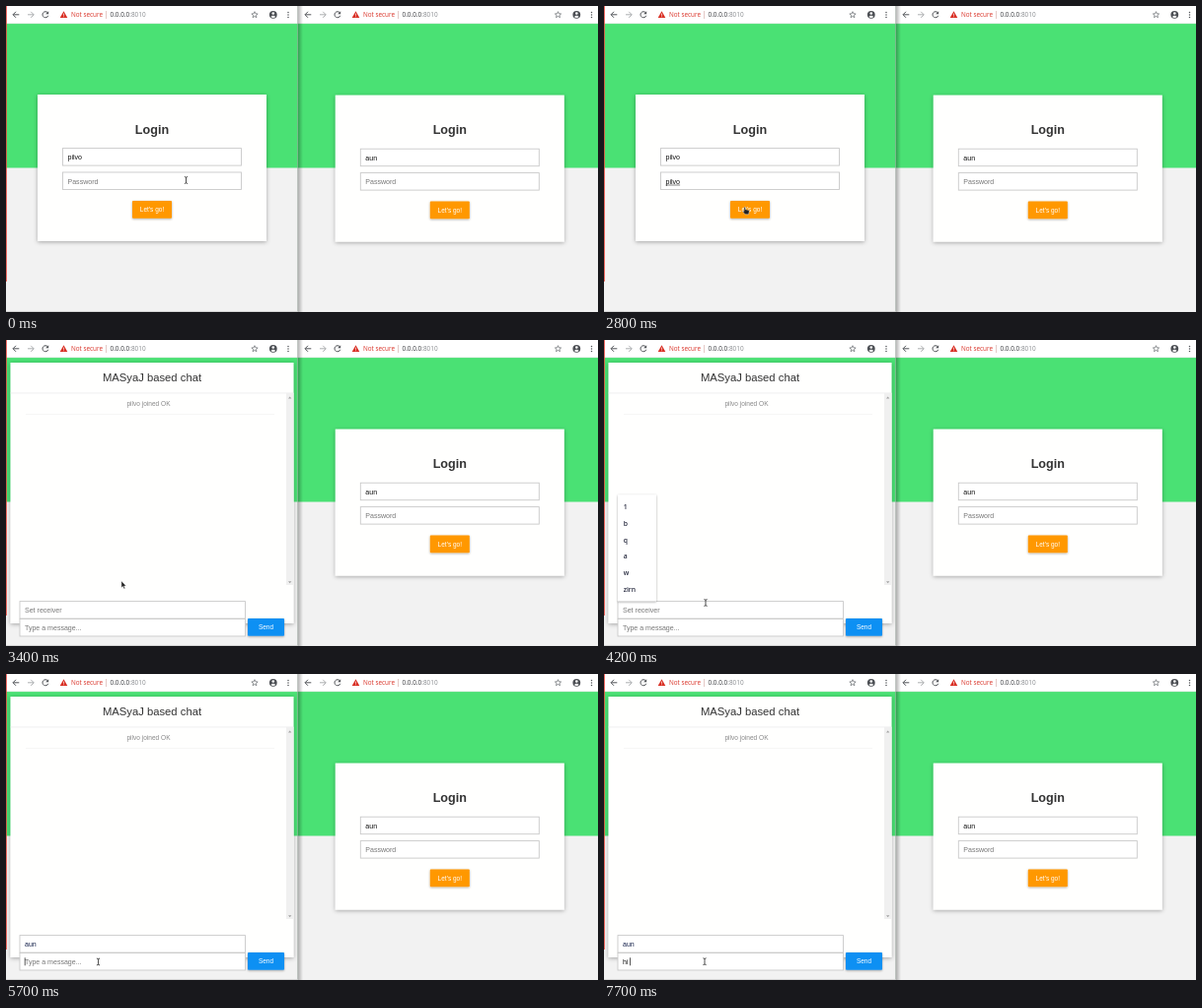
These frames come from a looping animation (600x311 px, 8000 ms). An HTML page:

```html
<!DOCTYPE html>
<html lang="en">
<head>
<meta charset="utf-8">
<title>Chat login</title>
<style>
  html, body { margin: 0; width: 100%; height: 100%; overflow: hidden; background: #f2f2f2; }
  svg { display: block; width: 100vw; height: 100vh; font-family: "Liberation Sans", Arial, sans-serif; }
  text { white-space: pre; }
  .ui { font-family: "Open Sans", "Noto Sans", sans-serif; }
</style>
</head>
<body>
<svg id="stage" viewBox="0 0 600 311">
  <defs>
    <filter id="soft" x="-10%" y="-10%" width="120%" height="125%">
      <feDropShadow dx="0" dy="1" stdDeviation="2" flood-color="#000" flood-opacity=".32"/>
    </filter>
    <filter id="small" x="-10%" y="-20%" width="120%" height="150%">
      <feDropShadow dx="0" dy=".8" stdDeviation=".8" flood-color="#000" flood-opacity=".35"/>
    </filter>
    <linearGradient id="edge">
      <stop offset="0" stop-color="#000" stop-opacity=".28"/>
      <stop offset="1" stop-color="#000" stop-opacity="0"/>
    </linearGradient>
    <clipPath id="leftClip"><rect width="296" height="311"/></clipPath>
  </defs>
  <g id="right"></g>
  <rect x="296" width="5" height="311" fill="url(#edge)"/>
  <g id="left" clip-path="url(#leftClip)"></g>
  <g id="cursor"></g>
</svg>
<script>
const LOOP = 8000;
const USER = "pilvo", PEER = "aun";
const $ = id => document.getElementById(id);

const rect = (x, y, w, h, fill, extra = "") =>
  `<rect x="${x}" y="${y}" width="${w}" height="${h}" fill="${fill}" ${extra}/>`;
const text = (x, y, size, fill, str, extra = "") =>
  `<text x="${x}" y="${y}" font-size="${size}" fill="${fill}" ${extra}>${str}</text>`;
const path = (d, extra) => `<path d="${d}" ${extra}/>`;
const mid = 'text-anchor="middle"';
const line = (color, w) => `fill="none" stroke="${color}" stroke-width="${w}"`;

// Advance widths in em, for placing the caret
const em = c => "il".includes(c) ? .222 : c === " " ? .278 : c === "v" ? .5 : .556;
const widthOf = str => [...str].reduce((sum, c) => sum + em(c), 0) * 7.05;

function toolbar(x, rightX) {
  const ink = line("#505357", 1);
  const star = Array.from({ length: 10 }, (_, i) => {
    const r = i % 2 ? 1.5 : 3.3, a = i * Math.PI / 5 - Math.PI / 2;
    return `${(rightX + 252 + r * Math.cos(a)).toFixed(2)},${(9 + r * Math.sin(a)).toFixed(2)}`;
  }).join(" ");
  const dots = [6.6, 9, 11.4].map(y => `<circle cx="${rightX + 286}" cy="${y}" r=".75" fill="#505357"/>`).join("");
  return path(`M${x + 13.3} 8.8h-6M${x + 10} 5.8l-3 3 3 3`, ink) +
    path(`M${x + 22} 8.8h6M${x + 25.2} 5.8l3 3-3 3`, line("#a3a5a8", .9)) +
    path(`M${x + 42.3} 6.8a3 3 0 1 0 .5 3`, ink) +
    path(`M${x + 43.2} 5.2v3h-3z`, 'fill="#505357"') +
    path(`M${x + 58.5} 5.3l3.8 6.7h-7.6z`, 'fill="#d93025"') +
    path(`M${x + 58.5} 7.6v2.1m0 .7v.8`, line("#fff", .7)) +
    text(x + 66, 11.2, 6.35, "#d93025", "Not secure", 'class="ui"') +
    rect(x + 101, 5, .6, 8, "#d3a5a2") +
    text(x + 105.5, 11.2, 6.4, "#303236", '0.0.0.0<tspan fill="#85888c">:8010</tspan>', 'class="ui"') +
    `<polygon points="${star}" ${line("#5f6368", .7)}/>`+ dots;
}

function avatar(x) {
  return `<circle cx="${x}" cy="8.8" r="3.9" fill="#4c4f54"/><circle cx="${x}" cy="7.5" r="1.3" fill="#fff"/>` +
    path(`M${x - 2.4} 11q2.4-2.3 4.8 0q-2.4 1.9-4.8 0z`, 'fill="#fff"');
}

const backdrop = (x, w) =>
  rect(x, 0, w, 311, "#f2f2f2") + rect(x, 18, w, 146.5, "#4ae174") + rect(x, 0, w, 18, "#fff") +
  rect(x, 17.5, w, .6, "#d5e5da");

const field = (x, y, w, h = 17.5) =>
  rect(x, y, w, h, "#fff", 'stroke="#c9c9c9" stroke-width=".9"');

const caret = (x, y) => rect(x, y, .7, 8, "#111");

function login(dx, dy, user, password) {
  return `<g transform="translate(${dx} ${dy})">` +
    rect(32, 90, 232, 149, "#fffffe", 'filter="url(#soft)"') +
    text(148, 129.6, 12.6, "#333", "Login", `${mid} font-weight="700"`) +
    field(57.5, 144.6, 181) + text(62.5, 156, 7.05, "#111", user) +
    field(57.5, 169, 181) + password +
    rect(128, 198, 40, 17.7, "#ff9803", 'rx=".8" filter="url(#small)"') +
    text(148, 209.4, 6.5, "#fff", "Let's go!", mid) + "</g>";
}

const hint = (x, y, str) => text(x, y, 7.05, "#777", str);

function popup(y, items) {
  const h = items.length * 16.7 + 8;
  return rect(14, y, 39, h, "#fff", 'filter="url(#small)"') +
    items.map((item, i) => text(19.7, y + 14.9 + i * 16.7, 6.8, "#25283d", item, 'class="ui" font-weight="600"')).join("");
}

function chat(t) {
  let out = rect(4.5, 23, 287, 265, "#fffffe", 'filter="url(#soft)"') +
    text(148, 42.2, 11.25, "#333", "MASyaJ based chat", mid) +
    rect(4.5, 53.6, 287, .7, "#e8e8e8") +
    rect(284, 54, 7.5, 195, "#f0f0f0") +
    path("M286 59.5h3.4l-1.7-2zM286 245.2h3.4l-1.7 2z", 'fill="#a2a2a2"');
  out += t < 3000
    ? text(148, 63.6, 7.45, "#888", "Connecting...", mid)
    : text(144.5, 67.1, 6.55, "#888", `${USER} joined OK`, mid) + rect(20, 75, 252, .6, "#f1f1f1");

  out += field(14, 265.6, 228.5) + field(14, 283.5, 228.5) +
    rect(245, 283, 37, 17.7, "#0f90f3", 'rx=".8" filter="url(#small)"') +
    text(263.5, 294.4, 6.5, "#fff", "Send", mid);

  const to = PEER.slice(0, t < 4300 ? 0 : t < 4600 ? 1 : t < 5200 ? 2 : 3);
  out += to ? text(19, 276.9, 7.05, t < 5200 ? "#111" : "#14204a", to) : hint(19, 276.9, "Set receiver");
  if ((t >= 3700 && t < 4200) || (t >= 4300 && t < 5700)) out += caret(19 + widthOf(to), 270.4);

  const msg = "hi ".slice(0, t < 6700 ? 0 : t < 7100 ? 1 : t < 7700 ? 2 : 3);
  out += msg ? text(19, 294.7, 7.05, "#111", msg) : hint(19, 294.7, "Type a message...");
  if (t >= 5700) out += caret(18.8 + widthOf(msg), 288.3);

  if (t >= 3700 && t < 4400) out += popup(157.3, ["1", "b", "q", "a", "w", "zirn"]);
  else if (t >= 4400 && t < 4700) out += popup(224.1, ["a", PEER]);
  else if (t >= 4700 && t < 5300) out += popup(284, [PEER]);
  return out;
}

function password(t) {
  const typed = [600, 1100, 1300, 1500, 1800].filter(at => t >= at).length;
  const str = USER.slice(0, typed);
  let out = typed ? text(62.5, 180.6, 7.05, "#111", str) : hint(62.5, 180.6, "Password");
  if (t >= 2700) out += rect(62.5, 181.7, 14.6, .6, "#333");
  else if (t >= 300) out += caret(62.4 + widthOf(str), 174);
  return out;
}

// Pointer legs: start, end, from, to
const legs = [
  [2200, 2700, 182.5, 177, 144, 208],
  [2800, 2900, 144, 208, 142.5, 204],
  [3100, 3600, 142.5, 204, 103, 267],
  [5200, 5600, 103, 267, 93.5, 292.5],
  [6200, 6600, 93.5, 292.5, 102, 292.2]
];

function pointer(t) {
  let x = 182.5, y = 177;
  for (const [a, b, x0, y0, x1, y1] of legs) {
    if (t < a) break;
    const k = Math.min(1, (t - a) / (b - a)), e = k * k * (3 - 2 * k);
    x = x0 + (x1 - x0) * e;
    y = y0 + (y1 - y0) * e;
  }
  return [x, y];
}

const shapes = {
  beam: path("M-1.6-3.4q1.6 0 1.6 1v4.8q0 1-1.6 1M1.6-3.4q-1.6 0-1.6 1M0 2.4q0 1 1.6 1", line("#222", .8)),
  arrow: path("M0 0v7l1.6-1.4 1.1 2.5 1.2-.5-1.1-2.4h2.1z", 'fill="#222" stroke="#fff" stroke-width=".5"'),
  hand: path("M-2-3.4q.9-.9 1.4.2v2l3 .6q1 .3.8 1.4l-.6 3h-3.6l-2.4-3q0-1 1.4-.2z", 'fill="#222" stroke="#fff" stroke-width=".4"')
};

function cursorShape(t, x, y) {
  if (t < 2900) return y < 187 ? "beam" : y > 198 && x < 168 ? "hand" : "arrow";
  return y > 265 ? "beam" : "arrow";
}

$("right").innerHTML = backdrop(296, 304) + toolbar(296, 307.5) + avatar(578.3) +
  login(301.8, .6, PEER, hint(62.5, 180.6, "Password"));

function draw(now) {
  const t = Math.floor((now % LOOP) / 100) * 100;
  $("left").innerHTML = backdrop(0, 296) + toolbar(0, 0) + avatar(270.8) +
    (t < 2900 ? login(0, 0, USER, password(t)) : chat(t)) +
    rect(0, 0, .8, 280, "#ee4a40") + rect(295.4, 0, .6, 311, "#9aa39d") + rect(0, 310.3, 296, .7, "#cfcfcf");
  const [x, y] = pointer(t);
  $("cursor").setAttribute("transform", `translate(${x} ${y})`);
  $("cursor").innerHTML = shapes[cursorShape(t, x, y)];
}

const start = performance.now();
function tick() {
  draw(performance.now() - start);
  requestAnimationFrame(tick);
}
tick();
</script>
</body>
</html>
```
